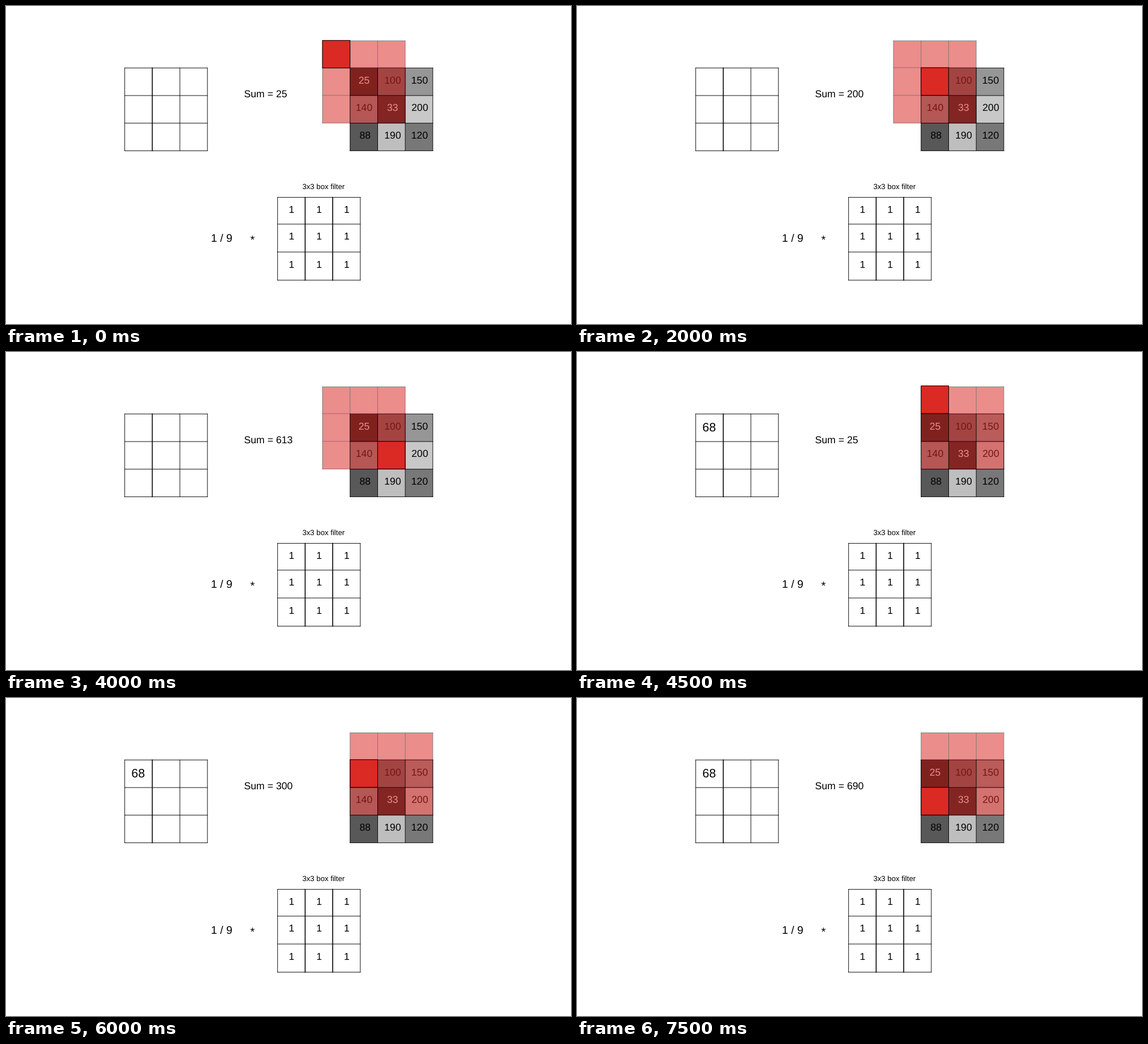
An HTML page for the animation above (8 s loop, 998 by 561 pixels).

```html
<!DOCTYPE html>
<html lang="en">
<head>
<meta charset="utf-8">
<title>Box filter</title>
<style>
  html, body { margin: 0; width: 100%; height: 100%; overflow: hidden; background: #fff; }
  svg { display: block; }
  text { font-family: "Liberation Sans", Arial, sans-serif; text-rendering: geometricPrecision; }
</style>
</head>
<body>
<svg id="stage" width="998" height="561" viewBox="0 0 998 561"></svg>
<script>
const stage = document.getElementById('stage');
const STEP = 500, STEPS = 16;
const PITCH = 48.7;
const RED = '#db2924';
const pixels = [[25, 100, 150], [140, 33, 200], [88, 190, 120]];

const ticks = from => [0, 1, 2, 3].map(i => from + i * PITCH);
const colX = ticks(607.8);
const rowY = ticks(109.3);

function add(tag, attrs, parent = stage) {
  const el = document.createElementNS('http://www.w3.org/2000/svg', tag);
  for (const key in attrs) el.setAttribute(key, attrs[key]);
  parent.appendChild(el);
  return el;
}

function label(str, x, y, size = 17.6, anchor = 'middle', fill = '#000') {
  const el = add('text', { x, y, fill, 'text-anchor': anchor, 'font-size': size });
  el.textContent = str;
  return el;
}

function grid(xs, ys, parent = stage, thick = []) {
  const line = (d, w) => add('path', { d, stroke: '#000', 'stroke-width': w, 'stroke-linecap': 'square' }, parent);
  ys.forEach(y => line(`M${xs[0]} ${y}H${xs[3]}`, 0.95));
  xs.forEach((x, i) => line(`M${x} ${ys[0]}V${ys[3]}`, thick.includes(i) ? 1.6 : 0.95));
}

// Result grid
grid(ticks(209.7), rowY, stage, [1]);
const result = label('68', 233.4, 140, 21.4);
const sumText = label('', 420.4, 160.8, 17.7, 'start');

// Kernel
label('3x3 box filter', 560.8, 323, 13.2);
grid(ticks(479.7), [337.6, 384.8, 434, 483.7], stage, [1, 2]);
for (const y of [365.2, 412.2, 461.7])
  for (const x of [504.3, 553.1, 602]) label('1', x, y);
label('1 / 9', 362, 416.2, 19.4, 'start');
label('*', 435.5, 418.9, 20);

// Image pixels
const textX = [[632.5, 683, 730.5], [632.5, 682.7, 731], [634.3, 683, 730.5]];
pixels.forEach((row, r) => row.forEach((v, c) =>
  add('rect', { x: colX[c], y: rowY[r], width: PITCH, height: PITCH, fill: `rgb(${v},${v},${v})` })));
grid(colX, rowY);
pixels.forEach((row, r) => row.forEach((v, c) =>
  label(v, textX[r][c], 136.6 + r * 48.5, 17.6, 'middle', v < 50 ? '#fff' : '#000')));

// Sliding window, one group per position
const winY = [61.4, 108.8, 157.7, 206.5];
const windows = [ticks(559), colX].map(xs => {
  const g = add('g', { opacity: 0.53 });
  add('rect', { x: xs[0], y: winY[0], width: xs[3] - xs[0], height: winY[3] - winY[0], fill: RED }, g);
  grid(xs, winY, g);
  return { g, xs };
});
const marker = add('rect', { fill: RED, stroke: '#000', 'stroke-width': 1 });

// Samples outside the image repeat its nearest edge pixel
function sample(pos, k) {
  const r = Math.max(0, Math.floor(k / 3) - 1);
  const c = Math.max(0, k % 3 + pos - 1);
  return pixels[r][c];
}

function show(step) {
  const pos = Math.floor(step / 9), cell = step % 9;
  let sum = 0;
  for (let k = 0; k <= cell; k++) sum += sample(pos, k);
  sumText.textContent = 'Sum = ' + sum;
  result.style.display = pos ? '' : 'none';
  windows.forEach((w, i) => w.g.style.display = i === pos ? '' : 'none');

  const c = cell % 3, r = Math.floor(cell / 3);
  const box = { x: windows[pos].xs[c], y: r ? winY[r] : 60.7 - pos, width: PITCH, height: PITCH };
  for (const key in box) marker.setAttribute(key, box[key]);
}

let shown = -1;
const start = performance.now();
function tick() {
  const step = Math.floor((performance.now() - start) / STEP) % STEPS;
  if (step !== shown) show(shown = step);
  requestAnimationFrame(tick);
}
tick();
</script>
</body>
</html>
```
